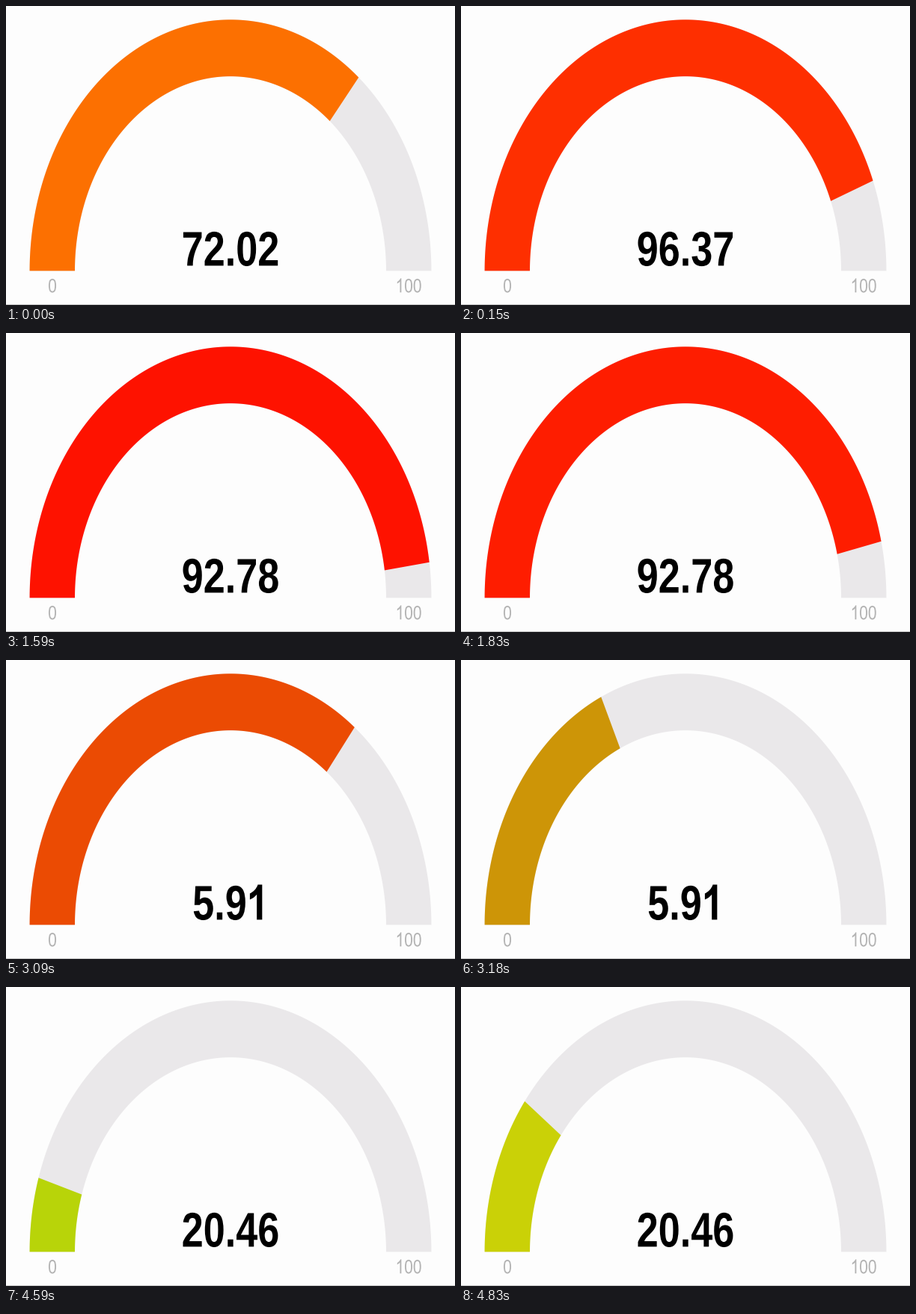
Animation of 600x400 px, one loop 5.1 s. Source, as a matplotlib script:

```python
import numpy as np
import matplotlib.pyplot as plt
from matplotlib.animation import FuncAnimation
from matplotlib.colors import to_rgb
from matplotlib.patches import PathPatch, Polygon, Rectangle
from matplotlib.path import Path
from matplotlib.textpath import TextPath
from matplotlib.transforms import Affine2D

W, H, DPI = 600, 400, 100
STEP_MS, FRAMES = 30, 170

PAPER, TRACK, LABEL, RULE = "#fdfdfd", "#eae8ea", "#b3b3b3", "#c4c4c4"
LEVELS = np.array([to_rgb(c) for c in ("#a9d70b", "#f9c802", "#ff0000")])

CX, CY = 300, 354.3
OUTER, INNER = (268.4, 336), (208, 260.2)
STRETCH = 1.25  # the dial is drawn taller than wide

START = 72.02
CHANGES = [(1, 11, 96.37), (53, 9, 92.78), (103, 9, 5.91), (153, 9, 20.46)]  # first frame, steps, reading

# Plain "1" without a foot, in 1/2048 em: line points and quadratic curves
ONE = {
    "normal": [(763, 0), (583, 0), (583, 1147), (518, 1085), (412, 1023),
               (307, 961), (223, 930), (223, 1104), (374, 1175), (487, 1276),
               (600, 1377), (647, 1472), (763, 1472), (763, 0)],
    "bold": [(806, 0), (525, 0), (525, 1059), (448, 987), (362, 930),
             (271, 881), (162, 846), (162, 1101), (272, 1137), (401, 1237),
             (530, 1338), (578, 1472), (806, 1472), (806, 0)],
}
ONE_CODES = ([Path.MOVETO] + [Path.LINETO] * 2 + [Path.CURVE3] * 4
             + [Path.LINETO] + [Path.CURVE3] * 4 + [Path.LINETO, Path.CLOSEPOLY])


def ring(start, end):
    """Points of the dial band between two readings (0 to 100)."""
    a = np.pi * (1 - np.linspace(start, end, 181) / 100)

    def arc(radii):
        return np.column_stack([CX + radii[0] * np.cos(a), CY - radii[1] * np.sin(a)])

    return np.vstack([arc(OUTER), arc(INNER)[::-1]])


def glyph(char, size, weight):
    if char == "1":
        return Path(np.array(ONE[weight]) * size / 2048, ONE_CODES)
    return TextPath((0, 0), char, size=size,
                    prop={"family": "Liberation Sans", "weight": weight})


def text_path(s, x, baseline, size, weight="normal"):
    """Outline of s centred on x by its advance width."""
    widths = [size * (0.278 if c == "." else 0.556) for c in s]
    pen = x - sum(widths) / 2
    parts = []
    for char, width in zip(s, widths):
        place = Affine2D().scale(1, -STRETCH).translate(pen, baseline)
        path = glyph(char, size, weight)
        parts.append(Path(place.transform(path.vertices), path.codes))
        pen += width
    return Path.make_compound_path(*parts)


def value_path(value):
    return text_path(f"{value:.2f}", CX, 347.4, 52.2, "bold")


def level_color(value):
    return np.array([np.interp(value, [0, 50, 100], channel) for channel in LEVELS.T])


def ease_out(n):
    return n ** 0.48


def state(frame):
    """Target reading, displayed reading and fill colour."""
    target = shown = START
    color = level_color(START)
    for first, steps, value in CHANGES:
        if frame < first:
            break
        n = min((frame - first) / (steps - 1), 1)
        k = ease_out(0.055 + 0.945 * n)
        target = value
        shown += (value - shown) * k
        color = color + (level_color(value) - color) * k
    return target, shown, color


fig = plt.figure(figsize=(W / DPI, H / DPI), dpi=DPI, facecolor=PAPER)
ax = fig.add_axes([0, 0, 1, 1])
ax.set(xlim=(0, W), ylim=(H, 0))
ax.axis("off")

ax.add_patch(Polygon(ring(0, 100), color=TRACK, lw=0))
level = ax.add_patch(Polygon(ring(0, START), color=level_color(START), lw=0))
ax.add_patch(PathPatch(text_path("0", 62, 383.2, 21), color=LABEL, lw=0))
ax.add_patch(PathPatch(text_path("100", 538, 383.2, 21), color=LABEL, lw=0))
number = ax.add_patch(PathPatch(value_path(START), color="black", lw=0))
ax.add_patch(Rectangle((0, H - 1), W, 1, color=RULE, lw=0))


def draw(frame):
    target, shown, color = state(frame)
    level.set_xy(ring(0, shown))
    level.set_color(color)
    number.set_path(value_path(target))
    return level, number


anim = FuncAnimation(fig, draw, frames=FRAMES, interval=STEP_MS,
                     repeat=True, repeat_delay=0)
plt.show()
```
